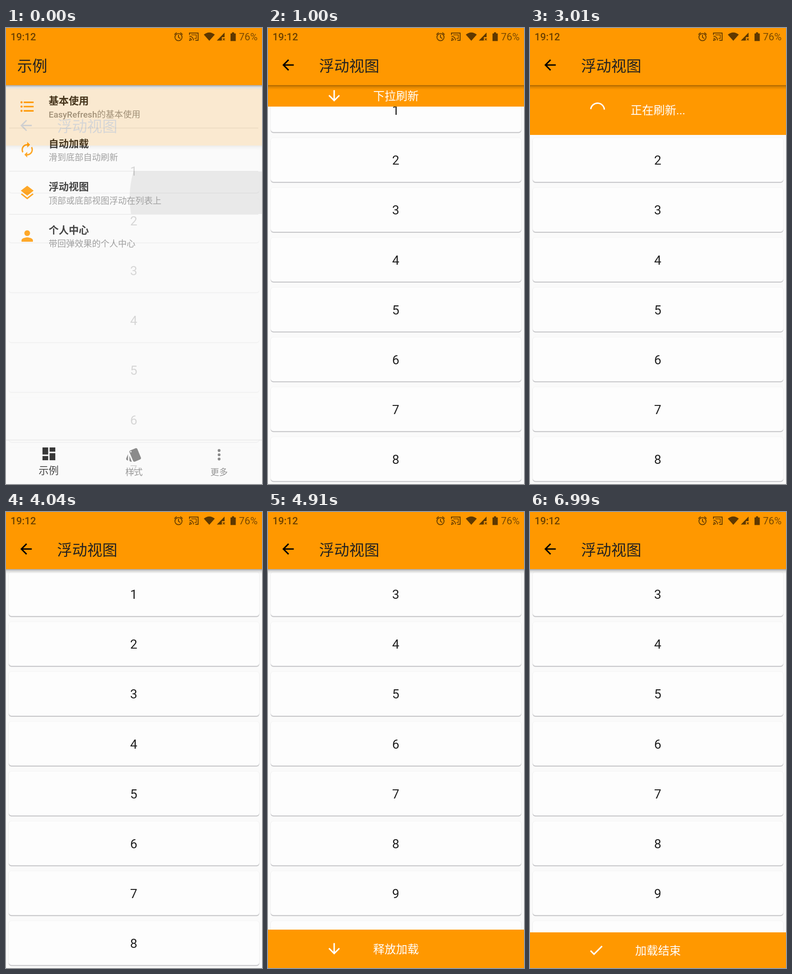
Animation of 561 by 998 pixels, one loop 7.01 s. Source, as an HTML page:

```html
<!DOCTYPE html>
<html lang="zh-CN">
<head>
<meta charset="utf-8">
<style>
html, body { margin: 0; width: 100%; height: 100%; overflow: hidden; background: #fafafa; }
body > svg { display: block; width: 100vw; height: 100vh; }
text { font-family: Roboto, "Noto Sans CJK SC", "Noto Sans CJK", "Noto Sans", sans-serif; fill: #212121; }
.mid { text-anchor: middle; }
.title { font-size: 33px; }
.name { font-size: 22px; font-weight: 700; }
.note { font-size: 19px; fill: #8f8f8f; }
.tip text { font-size: 25px; fill: #fff; }
.tip path { fill: #fff; }
.tip .arc { fill: none; stroke: #fff; stroke-width: 3; }
.num { font-size: 28px; }
</style>
</head>
<body>
<svg viewBox="0 0 561 998" preserveAspectRatio="none">
  <defs>
    <linearGradient id="fade" x2="0" y2="1">
      <stop stop-opacity=".34"/><stop offset=".4" stop-opacity=".13"/><stop offset="1" stop-opacity="0"/>
    </linearGradient>
    <g id="bar">
      <rect width="561" height="125" fill="#ff9800"/>
      <rect y="125" width="561" height="10" fill="url(#fade)"/>
    </g>
    <path id="back" d="M20 11H7.83l5.59-5.59L12 4l-8 8 8 8 1.41-1.41L7.83 13H20v-2z"/>
    <path id="done" d="M9 16.17L4.83 12l-1.42 1.41L9 19 21 7l-1.41-1.41z"/>
    <clipPath id="row"><rect y="314" width="561" height="93"/></clipPath>
  </defs>

  <g id="home">
    <rect width="561" height="998" fill="#fafafa"/>
    <circle cx="480" cy="372" r="209" fill="#e6e6e6" clip-path="url(#row)"/>
    <g id="menu"></g>
    <rect y="901" width="561" height="1.5" fill="#e4e4e4"/>
    <use href="#bar"/>
    <text class="title" x="24.5" y="94.5">示例</text>
    <g id="tabs"></g>
  </g>

  <g id="page">
    <rect width="561" height="998" fill="#fafafa"/>
    <g id="cards"></g>
    <svg id="header" class="tip" y="125" width="561"></svg>
    <svg id="footer" class="tip" width="561"></svg>
    <use href="#bar"/>
    <use href="#back" transform="translate(44 81) scale(1.56) translate(-12 -12)"/>
    <text class="title" x="112" y="94.5">浮动视图</text>
  </g>

  <g id="status" fill="#5e3800">
    <text x="10" y="27" font-size="22" font-weight="500" style="fill:#6b4000">19:12</text>
    <text x="510.5" y="27" font-size="22" style="fill:#7a4900">76%</text>
    <g fill="none" stroke="#6b4000" stroke-width="2">
      <circle cx="378" cy="20" r="7.8"/>
      <path d="M378 15v5.5l4 2.5M369 14.5l5-4.5M387 14.5l-5-4.5"/>
      <path d="M402 15v-4h19v16h-6M402 18a9 9 0 0 1 9 9M402 22.5a4.5 4.5 0 0 1 4.5 4.5"/>
      <path d="M406 15h11v8h-4" stroke-width="1.5"/>
    </g>
    <circle cx="403" cy="26.5" r="1.7"/>
    <path d="M433.5 14.5Q445.5 5 457.5 14.5L445.5 28z"/>
    <path d="M479 10V20H473V27.5H462z"/>
    <path d="M475 22.5l4.5 4.5m0-4.5l-4.5 4.5" stroke="#5e3800" stroke-width="1.4"/>
    <path d="M492 12h3v-2.5h5v2.5h3.5v16.5H492z"/>
  </g>
</svg>
<script>
const LOOP = 7010, PITCH = 109.1;
const $ = id => document.getElementById(id);
const clamp = x => Math.min(1, Math.max(0, x));
const icon = (d, x, y, fill) =>
  `<path d="${d}" fill="${fill}" transform="translate(${x} ${y}) scale(1.56) translate(-12 -12)"/>`;
const dot = (x, y, r) => `M${x - r} ${y}a${r} ${r} 0 1 0 ${2 * r} 0a${r} ${r} 0 1 0 ${-2 * r} 0z`;

// Timing curve through (x1,y1) and (x2,y2)
function bezier(x1, y1, x2, y2) {
  const f = (s, a, b) => 3 * (1 - s) * (1 - s) * s * a + 3 * (1 - s) * s * s * b + s ** 3;
  return x => {
    let lo = 0, hi = 1;
    for (let i = 0; i < 24; i++) {
      const m = (lo + hi) / 2;
      if (f(m, x1, x2) < x) lo = m; else hi = m;
    }
    return f(lo, y1, y2);
  };
}
const standard = bezier(.4, 0, .2, 1), easeIn = bezier(.42, 0, 1, 1);

// Eased value at t through [time, value] keys
function track(t, keys) {
  let v = keys[0][1];
  for (let i = 1; i < keys.length; i++) {
    const [t0, a] = keys[i - 1], [t1, b] = keys[i];
    const u = clamp((t - t0) / (t1 - t0));
    if (t >= t0) v = a + (b - a) * u * u * (3 - 2 * u);
  }
  return v;
}

const bullets = [6, 12, 18].map(y => dot(4, y, 1.5) + `M7 ${y - 1}h14v2H7z`).join('');
const renew = 'M12 6v3l4-4-4-4v3c-4.42 0-8 3.58-8 8 0 1.57.46 3.03 1.24 4.26L6.7 14.8c-.45-.83-.7-1.79-.7-2.8 0-3.31 2.69-6 6-6zm6.76 1.74L17.3 9.2c.44.84.7 1.79.7 2.8 0 3.31-2.69 6-6 6v-3l-4 4 4 4v-3c4.42 0 8-3.58 8-8 0-1.57-.46-3.03-1.24-4.26z';
const layers = 'M11.99 18.54l-7.37-5.73L3 14.07l9 7 9-7-1.63-1.27-7.38 5.74zM12 16l7.36-5.73L21 9l-9-7-9 7 1.63 1.27L12 16z';
const person = 'M12 12c2.21 0 4-1.79 4-4s-1.79-4-4-4-4 1.79-4 4 1.79 4 4 4zm0 2c-2.67 0-8 1.34-8 4v2h16v-2c0-2.66-5.33-4-8-4z';
const dashboard = 'M3 13h8V3H3v10zm0 8h8v-6H3v6zm10 0h8V11h-8v10zm0-18v6h8V3h-8z';
const swatch = 'M2.53 19.65l1.34.56v-9.03l-2.43 5.86c-.41 1.02.08 2.19 1.09 2.61zm19.5-3.7L17.07 3.98c-.31-.75-1.04-1.21-1.81-1.23-.26 0-.53.04-.79.15L7.1 5.95c-.75.31-1.21 1.03-1.23 1.8-.01.27.04.54.15.8l4.96 11.97c.31.76 1.05 1.22 1.83 1.23.26 0 .52-.05.77-.15l7.36-3.05c1.02-.42 1.51-1.59 1.09-2.6zM7.88 8.75c-.55 0-1-.45-1-1s.45-1 1-1 1 .45 1 1-.45 1-1 1zm-2 11c0 1.1.9 2 2 2h1.45l-3.45-8.34v6.34z';
const more = [6, 12, 18].map(y => dot(12, y, 2)).join('');

$('menu').innerHTML = [
  [bullets, '基本使用', 'EasyRefresh的基本使用'],
  [renew, '自动加载', '滑到底部自动刷新'],
  [layers, '浮动视图', '顶部或底部视图浮动在列表上'],
  [person, '个人中心', '带回弹效果的个人中心'],
].map(([d, name, note], i) => {
  const y = 94.4 * i;
  return icon(d, 46.5, 172 + y, '#ff9800') +
    `<text class="name" x="93.5" y="${166.5 + y}">${name}</text>` +
    `<text class="note" x="93.5" y="${196 + y}" font-weight="${i ? 400 : 500}">${note}</text>` +
    (i < 3 ? `<rect x="7" y="${218.5 + y}" width="546" height="1" fill="#dedede"/>` : '');
}).join('');

$('tabs').innerHTML =
  icon(dashboard, 94, 932, '#111') + icon(swatch, 280, 934, '#757575') + icon(more, 467, 934, '#757575') +
  '<text class="mid" x="93.5" y="976" font-size="22">示例</text>' +
  '<text class="mid note" x="280.5" y="978.5" style="fill:#828282">样式</text>' +
  '<text class="mid note" x="467" y="978.5" style="fill:#828282">更多</text>';

$('cards').innerHTML = Array.from({ length: 10 }, (_, i) => {
  const y = 131.25 + PITCH * i;
  const box = (dy, fill, op) =>
    `<rect x="6" y="${y + dy}" width="549" height="96.5" rx="6" fill="${fill}" opacity="${op}"/>`;
  return box(2, '#223', .2) +
    `<rect x="5" y="${y - .5}" width="551" height="99.5" rx="7" opacity=".05"/>` + box(0, '#fdfdfd', 1) +
    `<text class="mid num" x="279.8" y="${y + 59}">${i + 1}</text>`;
}).join('');

// A floating strip that walks through pull, release, busy and finished
function strip(id, fromBottom, labels, ready, start, end, keys, angle) {
  const el = $(id);
  el.innerHTML = `<rect width="561" height="998" fill="#ff9800"/><g>
    <text class="mid" x="280.5" y="9.5"></text>
    <path class="arrow" d="${$('back').getAttribute('d')}"/>
    <path class="check" d="${$('done').getAttribute('d')}" transform="translate(145 0) scale(1.56) translate(-12 -12)"/>
    <path class="arc"/></g>`;
  const [body, text, arrow, check, arc] =
    ['g', 'text', '.arrow', '.check', '.arc'].map(s => el.querySelector(s));
  const show = (node, on) => node.setAttribute('visibility', on ? 'inherit' : 'hidden');

  return t => {
    const h = track(t, keys);
    el.setAttribute('height', Math.max(h, .01));
    show(el, h > .1);
    if (fromBottom) el.setAttribute('y', 998 - h);
    body.setAttribute('transform', `translate(0 ${h / 2})`);
    text.textContent = labels[[ready, start, end].filter(x => t >= x).length];
    show(arrow, t < start);
    show(arc, t >= start && t < end);
    show(check, t >= end);
    const turn = angle + 180 * clamp((t - ready) / 100);
    arrow.setAttribute('transform', `translate(145 0) rotate(${turn}) scale(1.56) translate(-12 -12)`);
    arc.setAttribute('d', spinner(Math.max(0, t - start) * 1.57 / 1333));
  };
}

function spinner(turns) {
  const u = turns % 1, step = Math.floor(turns);
  const head = standard(clamp(u * 2)), tail = standard(clamp(u * 2 - 1));
  const a = (-90 + tail * 270 + u * 306 - step * 144) * Math.PI / 180;
  const sweep = Math.max(.02, (head - tail) * 1.5 * Math.PI);
  const at = q => `${148 + 15 * Math.cos(q)} ${15 * Math.sin(q)}`;
  return `M${at(a)}A15 15 0 ${sweep > Math.PI ? 1 : 0} 1 ${at(a + sweep)}`;
}

const header = strip('header', false, ['下拉刷新', '释放刷新', '正在刷新...', '刷新结束'], 1300, 1990, 3190,
  [[650, 0], [1500, 127], [1850, 127], [1990, 109], [3800, 109], [4000, 0]], -90);
const footer = strip('footer', true, ['上拉加载', '释放加载', '正在加载...', '加载结束'], 4793, 5190, 6390,
  [[4660, 0], [4820, 84], [5070, 84], [5190, 78]], 90);

function draw(t) {
  // The page is already sliding in when the loop opens
  const u = clamp(.338 + Math.max(0, t - 25) / 110 * .662);
  $('page').setAttribute('transform', `translate(0 ${249.5 * (1 - standard(u))})`);
  $('page').setAttribute('opacity', easeIn(u));
  $('cards').setAttribute('transform', `translate(0 ${-track(t, [[4262, 0], [4684, 2 * PITCH]])})`);
  header(t);
  footer(t);
}

const begin = performance.now();
function frame() {
  draw((performance.now() - begin) % LOOP);
  requestAnimationFrame(frame);
}
frame();
</script>
</body>
</html>
```
